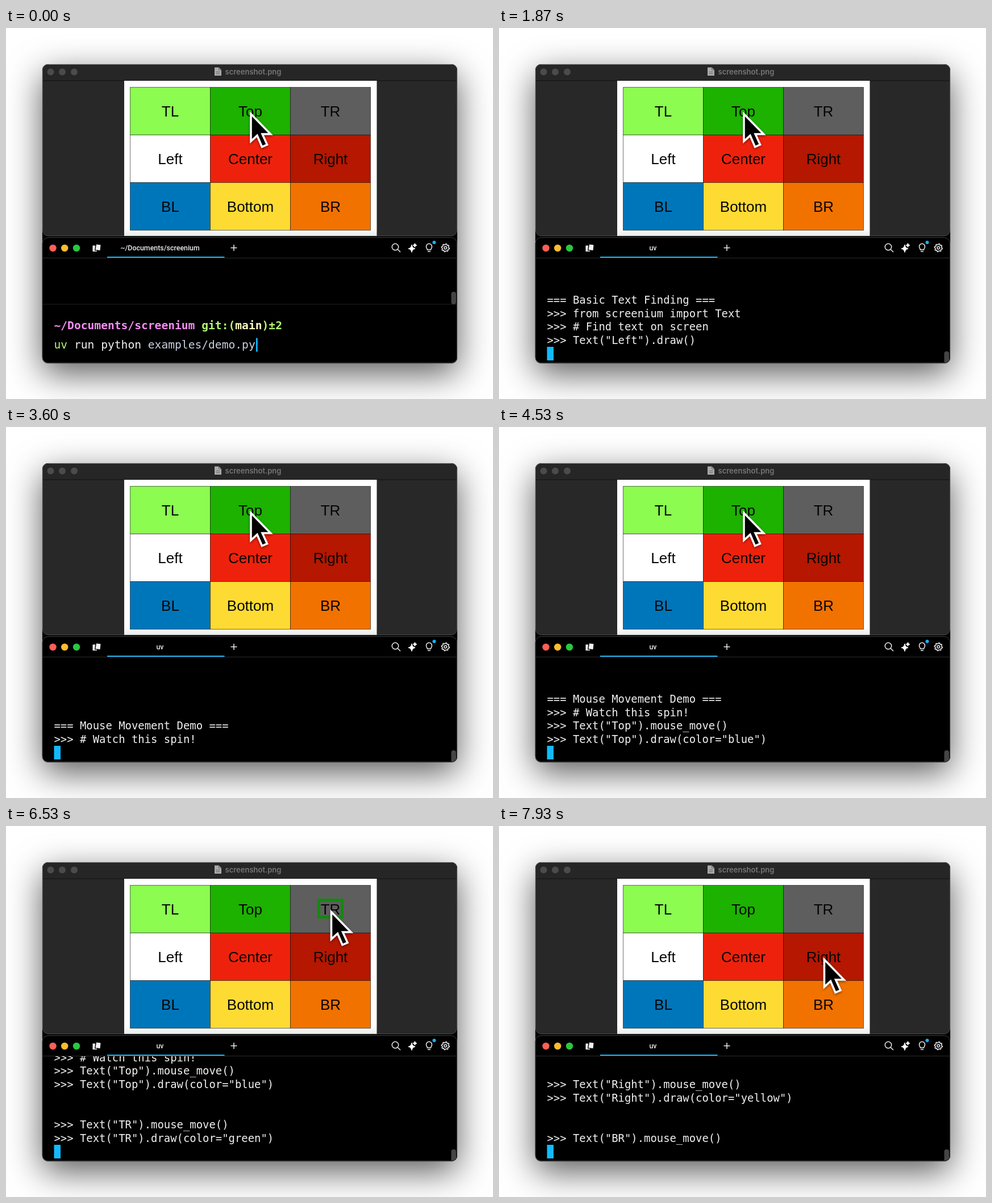
These frames come from a looping animation (857x654 px, 8 s). An HTML page:

```html
<!DOCTYPE html>
<html lang="en">
<head>
<meta charset="utf-8">
<title>Screen automation demo</title>
<style>
html, body { margin: 0; width: 100%; height: 100%; overflow: hidden; background: #fff; }
#window { position: absolute; left: 63.5px; top: 64px; width: 730.5px; height: 526.5px; border-radius: 10px;
  background: #000; box-shadow: 0 18px 60px rgba(0, 0, 0, .65), 0 0 1px #000; }
svg { position: absolute; left: 0; top: 0; }
text { white-space: pre; }
.mono { font-family: "DejaVu Sans Mono", monospace; font-size: 18.9px; fill: #f1f1f1; }
.bold { font-weight: 700; }
.prompt { font-size: 19.63px; }
.past { font-size: 17.67px; fill: #8b8b8b; }
.green { fill: #b4fa72; }
.cell { font: 26px "Liberation Sans", Arial, sans-serif; text-anchor: middle; fill: #050505; }
.title { font: 600 13px Inter, sans-serif; fill: #777; }
.tab { font: 500 12.4px Roboto, sans-serif; text-anchor: middle; fill: #eee; }
.line { fill: none; stroke: #eee; stroke-width: 1.5; }
</style>
</head>
<body>
<div id="window"></div>
<svg width="857" height="654" viewBox="0 0 857 654">
  <defs>
    <clipPath id="view"><path d="M64 406H794V580a10 10 0 0 1-10 10H74a10 10 0 0 1-10-10z"/></clipPath>
    <linearGradient id="paper" x2="0" y2="1">
      <stop offset=".95" stop-color="#fff"/><stop offset="1" stop-color="#e8ece9"/>
    </linearGradient>
    <filter id="shade" x="-50%" y="-50%" width="200%" height="200%">
      <feDropShadow dx="0" dy="2" stdDeviation="2" flood-opacity=".45"/>
    </filter>
  </defs>

  <!-- Image viewer -->
  <rect x="64.5" y="64.5" width="729" height="302" rx="10" fill="#282828" stroke="#4b4b4b"/>
  <path d="M65 93V74a9 9 0 0 1 9-9H784a9 9 0 0 1 9 9V93z" fill="#262626"/>
  <path d="M65 93H793" stroke="#111"/>
  <g fill="#4b4b4b"><circle cx="78.5" cy="77.5" r="6"/><circle cx="99" cy="77.5" r="6"/><circle cx="120" cy="77.5" r="6"/></g>
  <path d="M367 69.5H374.5L379 74V84H367z" fill="#aaa"/>
  <path d="M374.5 69.5V74H379M369.5 77.5H376.5M369.5 80.5H376.5" fill="none" stroke="#666"/>
  <text class="title" x="385.5" y="81.5">screenshot.png</text>
  <rect x="208" y="93" width="444.5" height="273.5" fill="url(#paper)"/>
  <g id="grid"></g>
  <rect id="mark" fill="none" stroke-width="5"/>

  <!-- Terminal -->
  <rect x="64" y="369.5" width="729.5" height="220.5" rx="10" fill="#000" stroke="#3f3f3f"/>
  <path d="M64.5 405.5H793.5" stroke="#2b2b2b"/>
  <circle cx="82.5" cy="388" r="6.2" fill="#ff5f57"/>
  <circle cx="103.2" cy="388" r="6.2" fill="#fdbc2e"/>
  <circle cx="124" cy="388" r="6.2" fill="#28c840"/>
  <path d="M152.5 383.5H157L156 392.5H160V394H152.5z M159 381.5L166.5 382.5L165.500 392L157.500 391z" fill="#f2f2f2"/>
  <text class="tab" id="tab" x="271" y="392"></text>
  <path d="M395.500 387.500H406.500M401 382V393" class="line"/>
  <g class="line">
    <circle cx="685" cy="386" r="5.700"/><path d="M689.200 390.200L694 395"/>
    <path d="M741.500 391C741.500 389 739.500 388.500 739.500 385.200A5 5 0 0 1 749.500 385.200C749.500 388.500 747.500 389 747.500 391zM742 394H747"/>
    <circle cx="773.300" cy="387.500" r="2.300"/>
    <path id="gear" stroke-linejoin="round"/>
  </g>
  <path d="M714 382Q715 388 720 389Q715 390 714 395.500Q713 390 708 389Q713 388 714 382z M719.500 379.500Q720 382.500 723 383Q720 383.500 719.500 386.500Q719 383.500 716 383Q719 382.500 719.500 379.500z" fill="#fff" stroke="#fff"/>
  <circle cx="753.500" cy="378" r="3" fill="#13b3f8"/>

  <g clip-path="url(#view)">
    <g id="input">
      <path d="M64.500 487H793" stroke="#232323"/>
      <rect x="783.500" y="465" width="8.500" height="22" rx="4" fill="#454545"/>
      <text class="mono prompt bold" x="84.500" y="531"><tspan fill="#f78df3">~/Documents/screenium</tspan><tspan class="green"> git:(</tspan><tspan fill="#fcfbc2">main</tspan><tspan class="green">)±2</tspan></text>
      <text class="mono prompt" x="84.500" y="565"><tspan class="green">uv</tspan> run python <tspan fill="#c9cfe0">examples/demo.py</tspan></text>
      <rect x="440" y="546.500" width="2.700" height="24" fill="#13b9ff"/>
    </g>
    <g id="running">
      <g id="history">
        <text class="mono past" x="84.500" y="417">~/Documents/screenium git:(main)±2 (0.031s)</text>
        <text class="mono bold" x="84.500" y="446">clear</text>
        <path d="M64.500 474.500H782" stroke="#232323"/>
        <text class="mono past" x="84.500" y="517">~/Documents/screenium git:(main)±2</text>
        <text class="mono bold" x="84.500" y="545.500">uv run python examples/demo.py</text>
      </g>
      <g id="output"></g>
      <rect x="84.500" y="562" width="11.500" height="24" fill="#13b9ff"/>
      <rect x="783.500" y="570" width="8.500" height="24" rx="4" fill="#454545"/>
    </g>
  </g>
  <path d="M178 404H384.500" stroke="#1cb0f0" stroke-width="2"/>

  <path id="pointer" d="M1.500 2V50L12.500 40L21 60L30 56L21.500 37.500H36z" fill="#000" stroke="#fff" stroke-width="3.500" filter="url(#shade)"/>
</svg>
<script>
const $ = id => document.getElementById(id);
const LOOP = 8000, START = 100, LINE = 23.75;

const cells = [
  ["TL", "#8cfc51"], ["Top", "#1db100"], ["TR", "#5e5e5e"],
  ["Left", "#ffffff"], ["Center", "#ee220c"], ["Right", "#b51700"],
  ["BL", "#0076ba"], ["Bottom", "#fedb33"], ["BR", "#f27200"]
];
$("grid").innerHTML = cells.map(([name, color], i) => {
  const x = 218.5 + i % 3 * 141, y = 104.5 + Math.floor(i / 3) * 84;
  return `<rect x="${x}" y="${y}" width="141" height="84" fill="${color}" stroke="#000" stroke-opacity=".55"/>
    <text class="cell" x="${x + 70.5}" y="${y + 51.5}">${name}</text>`;
}).join("");

let gear = "";
for (let i = 0; i < 32; i++) {
  const a = (i + .5) * Math.PI / 16, r = i % 4 < 2 ? 7 : 5.4;
  gear += `${i ? "L" : "M"}${773.3 + r * Math.cos(a)} ${387.5 + r * Math.sin(a)}`;
}
$("gear").setAttribute("d", gear + "z");

const move = name => `>>> Text("${name}").mouse_move()`;
const draw = (name, color) => `>>> Text("${name}").draw(color="${color}")`;
// A heading clears the screen before it prints.
const prints = [
  [1070, "=== Basic Text Finding ==="],
  [1200, ">>> from screenium import Text"],
  [1400, ">>> # Find text on screen"],
  [1560, '>>> Text("Left").draw()'],
  [3030, "=== Mouse Movement Demo ==="],
  [3330, ">>> # Watch this spin!"],
  [4030, move("Top")],
  [4200, draw("Top", "blue")],
  [5500, "\n\n" + move("TR")],
  [5640, draw("TR", "green")],
  [6670, "\n\n" + move("Right")],
  [6810, draw("Right", "yellow")],
  [7830, "\n\n" + move("BR")]
];
// start, end, centre x, centre y, width, colour
const marks = [
  [1930, 2670, 289.8, 229.5, 52, "#128a0c"],
  [4930, 5430, 430, 145.5, 49, "#0a22f5"],
  [6130, 6600, 571, 145.5, 41, "#128a0c"],
  [7300, 7770, 571, 229.5, 67, "#fff400"]
];
const ramp = (t, start, span) => Math.min(1, Math.max(0, (t - start) / span));
const escape = s => s.replace(/&/g, "&amp;").replace(/</g, "&lt;").replace(/>/g, "&gt;");
const show = (id, on) => $(id).style.display = on ? "" : "none";

let shown = -1;
function print(count) {
  if (count === shown) return;
  shown = count;
  let lines = [];
  for (const [, text] of prints.slice(0, count)) {
    if (text.startsWith("===")) lines = [];
    lines.push(...text.split("\n"));
  }
  $("output").innerHTML = lines.map((s, i) =>
    `<text class="mono" x="84.5" y="${557 - (lines.length - 1 - i) * LINE}">${escape(s)}</text>`).join("");
}

function render(t) {
  const running = t >= START;
  show("input", !running);
  show("running", running);
  show("history", t < prints[0][0]);
  $("tab").textContent = running ? "uv" : "~/Documents/screenium";
  print(prints.filter(p => p[0] <= t).length);

  const mark = marks.find(m => t >= m[0] && t < m[1]);
  show("mark", mark);
  if (mark) {
    const [, , x, y, width, stroke] = mark;
    const box = { x: x - width / 2, y: y - 15, width, height: 30, stroke };
    for (const key in box) $("mark").setAttribute(key, box[key]);
  }

  const x = 429.5 + 141.5 * ramp(t, 5735, 340);
  const y = 149.5 + 84 * ramp(t, 6907, 340);
  $("pointer").setAttribute("transform", `translate(${x} ${y})`);
}

const begin = performance.now();
function tick() {
  render((performance.now() - begin) % LOOP);
  requestAnimationFrame(tick);
}
tick();
</script>
</body>
</html>
```
